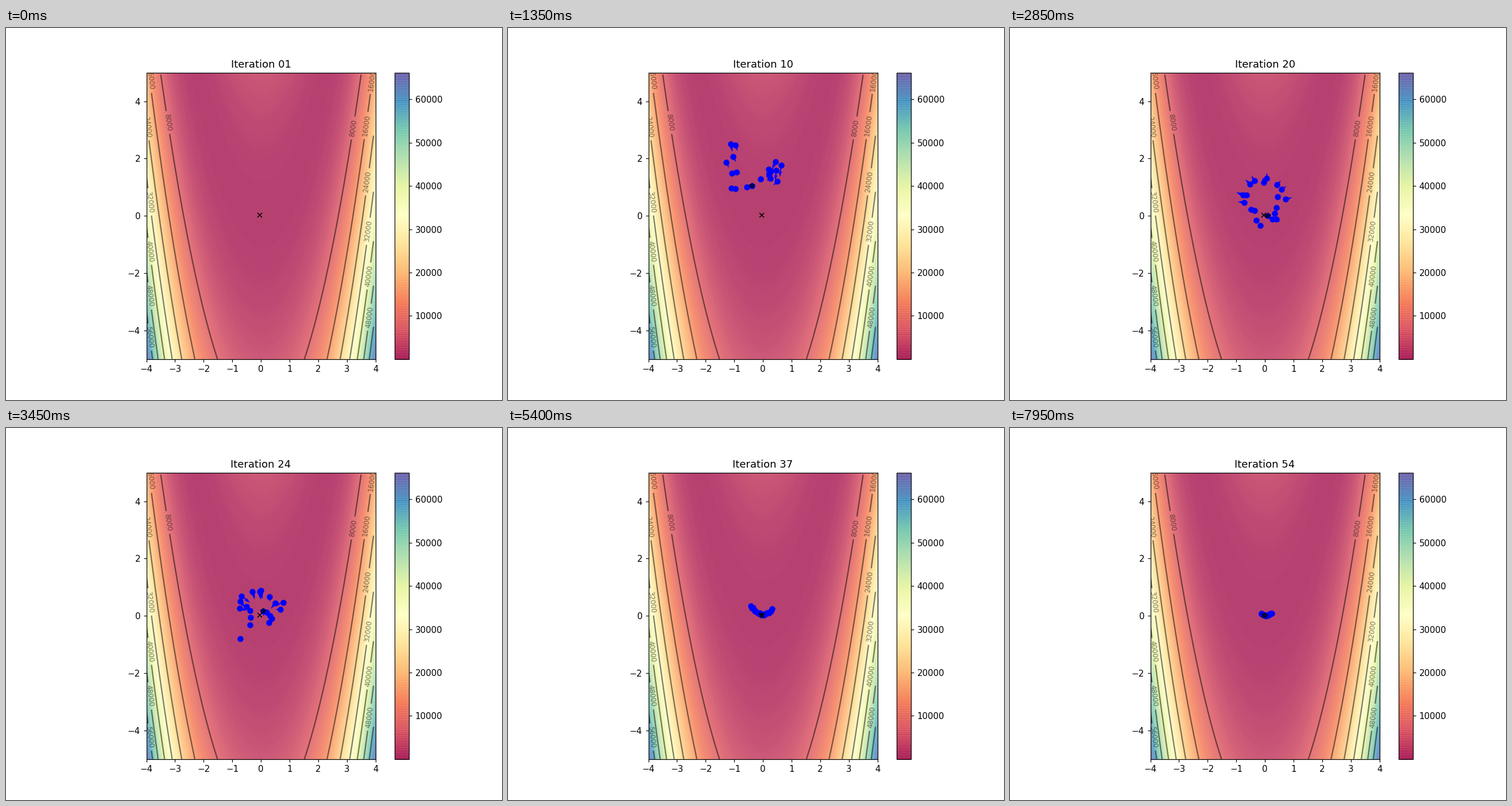
Animation of 864x648 px, one loop 8 s. Source, as a matplotlib script:

```python
import numpy as np
import matplotlib.pyplot as plt
from matplotlib.animation import FuncAnimation

STEP_MS, TICK_MS, LOOP_MS = 150, 50, 8000
COUNT, BAND, TOP = 20, 200, 66200
rng = np.random.default_rng(7)


def cost(x, y):
    return x**2 + 150 * (y - x**2)**2


def contour_y(level, x):
    return x**2 - np.sqrt(level / 150)


def key(step, x, y, jitter, leader, velocity):
    """Pose and velocity of the swarm at one step; particle 0 is the leader."""
    pos = np.column_stack([x, y]) + rng.uniform(-jitter, jitter, (COUNT, 2))
    pos[0] = leader
    return step, pos, np.column_stack(velocity(*pos.T))


# Swarm shapes, each a curve over u with some scatter
u = np.linspace(-1, 1, COUNT)
side = np.where(u < 0, -1, 1)
climb = 2 * np.abs(u) - 1
angle = np.pi * (u + .5)
fan = .95 * u * np.abs(u)

KEYS = [
    key(1, .1 + 1.4 * u, -8 + 0 * u, .7, (.2, -7.5),
        lambda x, y: (-.1 * x, 1 + 0 * y)),
    key(7, -.18 + .52 * side, .78 + np.where(side < 0, .7, .3) * climb, .13, (-.22, .04),
        lambda x, y: (.35 * x - .05, .42 + .45 * y)),
    key(14, -.2 + .5 * u, .72 - .35 * u - .5 * u**3, .16, (-.02, 0),
        lambda x, y: (.03 - .18 * x, -.24 + .1 * y)),
    key(20, -.05 + .6 * np.cos(angle), .5 + .65 * np.sin(angle), .2, (.1, 0),
        lambda x, y: (.3 * x, .2 * (y - .3))),
    key(29, .05 + .65 * u**3, .45 * u**2 - .2, .07, (.1, 0),
        lambda x, y: (1.6 * x * abs(x), .95 * x**2)),
    key(37, -.08 + .4 * u, 1.6 * (.4 * u - .08)**2 + .05, .03, (-.05, .02),
        lambda x, y: (-.18 * x, -.2 * y)),
    key(54, .04 + .19 * u, .08 * np.abs(u), .015, (0, 0),
        lambda x, y: (-.15 * x, -.2 * y)),
]
sway = rng.normal(0, .3, (COUNT, 2)) * (1, .7)


def positions(step):
    """Hermite path between keys plus a swing that dies out."""
    i = max(j for j in range(len(KEYS) - 1) if KEYS[j][0] <= step)
    (s0, p0, v0), (s1, p1, v1) = KEYS[i:i + 2]
    span = s1 - s0
    t = min((step - s0) / span, 1)
    pos = ((2*t**3 - 3*t**2 + 1) * p0 + (t**3 - 2*t**2 + t) * span * v0
           + (3*t**2 - 2*t**3) * p1 + (t**3 - t**2) * span * v1)
    swing = np.sin(np.pi * t)**2 * np.cos(.9 * (step - s0)) * np.exp((7 - step) / 25)
    return pos + sway * swing * (s0 >= 7)


def velocities(step):
    for s, _, v in KEYS:
        if s == step:
            return v
    return positions(step + 1) - positions(step)


fig, ax = plt.subplots(figsize=(8, 6), dpi=108)

# Banded surface
X, Y = np.meshgrid(np.linspace(-4, 4, 800), np.linspace(-5, 5, 1000))
Z = cost(X, Y)
surface = ax.imshow((Z // BAND + .5) * BAND, cmap="Spectral", alpha=.75, vmin=0, vmax=TOP,
                    extent=(-4, 4, -5, 5), origin="lower", interpolation="nearest")
bar = fig.colorbar(surface, ax=ax, ticks=np.arange(10000, 60001, 10000))
bar.solids.set_alpha(.92)
bar.ax.hlines(np.arange(0, TOP, 2 * BAND), 0, 1, color="white", alpha=.2, lw=.67)

# Contour lines, labelled close to the side edges
levels = np.arange(8000, 56001, 8000)
lines = ax.contour(X[::8, ::8], Y[::8, ::8], Z[::8, ::8], levels, colors="black", alpha=.5)
fig.draw_without_rendering()
left = np.where(levels == 8000, -3.25, np.where(levels == 24000, -3.97, -3.885))
right = np.where(levels == 8000, 3.22, np.where(levels == 16000, 3.88, 3.97))
spots = [(x, contour_y(level, x)) for xs in (left, right) for level, x in zip(levels, xs)]
ax.clabel(lines, inline=True, fontsize=8, manual=spots)

title = ax.set_title("")
dots, = ax.plot([], [], "bo", markersize=6, zorder=3)
arrows = ax.quiver(*KEYS[0][1].T, *KEYS[0][2].T, color="blue", angles="xy",
                   scale_units="xy", scale=1, width=.005, zorder=4)
best, = ax.plot([], [], "k*", markersize=7, alpha=.65, zorder=5)
ax.plot(-.04, .02, "kx", markersize=5.5, zorder=6)
ax.set(xlim=(-4, 4), ylim=(-5, 5), xticks=range(-4, 5), yticks=range(-4, 5, 2))


def draw(frame):
    step = frame * TICK_MS // STEP_MS + 1
    pos, vel = positions(step), velocities(step)
    title.set_text(f"Iteration {step:02d}")
    dots.set_data(*pos.T)
    arrows.set_offsets(pos)
    arrows.X, arrows.Y = pos.T
    arrows.XY = pos
    arrows.set_UVC(*vel.T)
    best.set_data(*pos[:1].T)
    return title, dots, arrows, best


anim = FuncAnimation(fig, draw, frames=LOOP_MS // TICK_MS, interval=TICK_MS,
                     repeat=True, repeat_delay=0)
plt.show()
```
